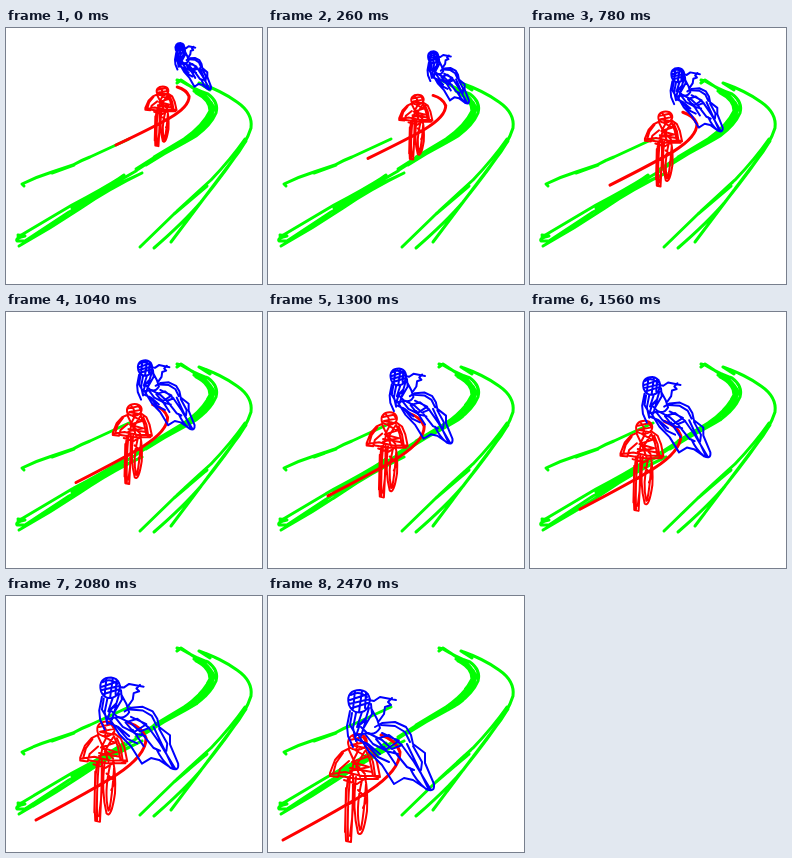
An HTML page that plays this animation: 256 px wide and 256 px high, repeating every 2.6 s.

```html
<!DOCTYPE html>
<html>
<head>
<meta charset="utf-8">
<title>Riders on a bend</title>
<style>
html, body { margin: 0; height: 100%; overflow: hidden; background: #fff; }
svg { display: block; width: 100vw; height: 100vh; }
path { fill: none; stroke-width: 2; stroke-linecap: round; stroke-linejoin: round; vector-effect: non-scaling-stroke; }
.line { stroke-width: 3; }
</style>
</head>
<body>
<svg viewBox="0 0 256 256">
  <g stroke="#0f0">
    <path class="line" d="M18 158L16 156Q30 149 46 144L67 137Q76 132 84 129L123 111M46 145L68 137"/>
    <!-- the bend, built from overlapping strokes -->
    <path class="line" d="M171 52L175 53Q190 62 202 66Q213 74 210 85Q205 97 190 108C172 119 152 128 131 142
      M171 55L175 52L190 62Q207 70 206 83Q200 96 183 109L132 140
      M188 63Q204 69 208 80Q206 91 194 102Q176 116 160 122L130 141
      M190 65Q204 72 204 83Q197 98 178 111L148 129M166 121L140 137"/>
    <path class="line" d="M118 147Q98 162 66 177M117 148Q95 162 66 177L12 209M136 145L97 163L66 180L130 143
      M136 145Q103 161 75 180Q45 200 13 218M97 166L63 184L19 213M12 207L19 208Q9 210 11 213L18 213"/>
    <path class="line" d="M193 55Q216 63 231 74Q247 85 245 100Q240 116 226 133L165 214M193 55L204 62
      M239 111Q225 131 205 152Q185 170 168 186L134 219M240 113Q221 142 195 174Q178 194 148 220
      M206 151L171 183M201 158L168 186"/>
  </g>
  <g id="red" stroke="#f00">
    <path class="line" d="M113 139Q128 144 132 156C132 170 119 183 101 195Q78 210 15 244"/>
    <path d="M81 151C78 143 83 138 90 138C98 138 101 145 97 151Q89 157 81 151M82 144L95 141L98 146L83 149L97 152M85 140Q92 147 88 154
      M82 152L74 156L67 164L62 177L62 180L70 181L72 173L81 165M75 157L68 167L65 178
      M97 150L105 156L109 166L112 181L105 183M101 156L105 166L107 179M98 154L102 165L105 180
      M81 154L86 165L83 179M87 154L99 161L84 166L101 171L82 175M91 153L85 165L97 178M97 155L88 170L92 181
      M64 178L77 176L94 180L111 180M72 180L90 183L110 183M82 172L104 176"/>
    <path d="M80 181Q76 212 78 245L83 246Q85 210 85 183M82 180Q79 215 80 244M78 192L77 236M85 179Q87 204 82 240
      M76 184L89 188L98 182M88 181Q84 213 90 237Q95 243 99 215Q100 194 97 181M94 184Q87 214 92 234
      M98 188Q96 218 93 233M90 194L99 203L95 212M79 209L85 206"/>
  </g>
  <g id="blue" stroke="#00f">
    <path d="M81 109C78 98 84 94 92 94C101 95 104 103 100 111C96 118 85 119 81 109M83 99Q91 94 99 101M82 104L100 98M81 108L102 103
      M84 112L100 107M87 95L85 113M94 95L91 116M98 97L97 112
      M101 104L106 105L112 101L128 104M124 102L120 106L123 109L117 111L116 118L111 125
      M82 115L79 130L80 140L85 151M84 117L82 129L88 139M88 117L85 132L88 145M101 112L98 122L92 128L88 140
      M103 108L104 118L95 133M94 116L89 131L98 124L93 140M103 112L109 123L112 132Q107 140 99 137L93 131"/>
    <path d="M107 131L114 127L127 126L138 131L143 139L145 148L157 157L157 167L166 188Q167 197 158 193Q148 185 142 172
      M113 129L127 130L137 136L142 146M89 139L100 137L114 144L124 153L134 149L121 139L108 143L118 155L130 158
      M97 138L105 148L117 154L131 145L114 137M88 143L100 148L112 158M91 140L101 156L114 169L126 188
      M98 147L110 161L121 166M116 151L128 169M126 188L136 182L145 184L157 192
      M133 148L146 166L163 194M139 148L149 169L160 192M145 150L154 166L153 174M126 155L139 171L146 174"/>
  </g>
</svg>
<script>
const LOOP = 2600, STEPS = 20;

// Far pose relative to the near pose as drawn: x scale, y scale, x shift, y shift.
const riders = [
  { el: document.getElementById("red"), far: [0.625, 0.5525, 100.6, -17.8] },
  { el: document.getElementById("blue"), far: [0.414, 0.465, 136.3, -28.7] }
];
const near = [1, 1, 0, 0];

function draw(now) {
  const step = Math.floor(now % LOOP / LOOP * STEPS);
  const p = step / (STEPS - 1);
  for (const { el, far } of riders) {
    const [sx, sy, dx, dy] = far.map((v, i) => v + (near[i] - v) * p);
    el.setAttribute("transform", `matrix(${sx} 0 0 ${sy} ${dx} ${dy})`);
  }
}

let start;
function tick(now) {
  start ??= now;
  draw(now - start);
  requestAnimationFrame(tick);
}
draw(0);
requestAnimationFrame(tick);
</script>
</body>
</html>
```
